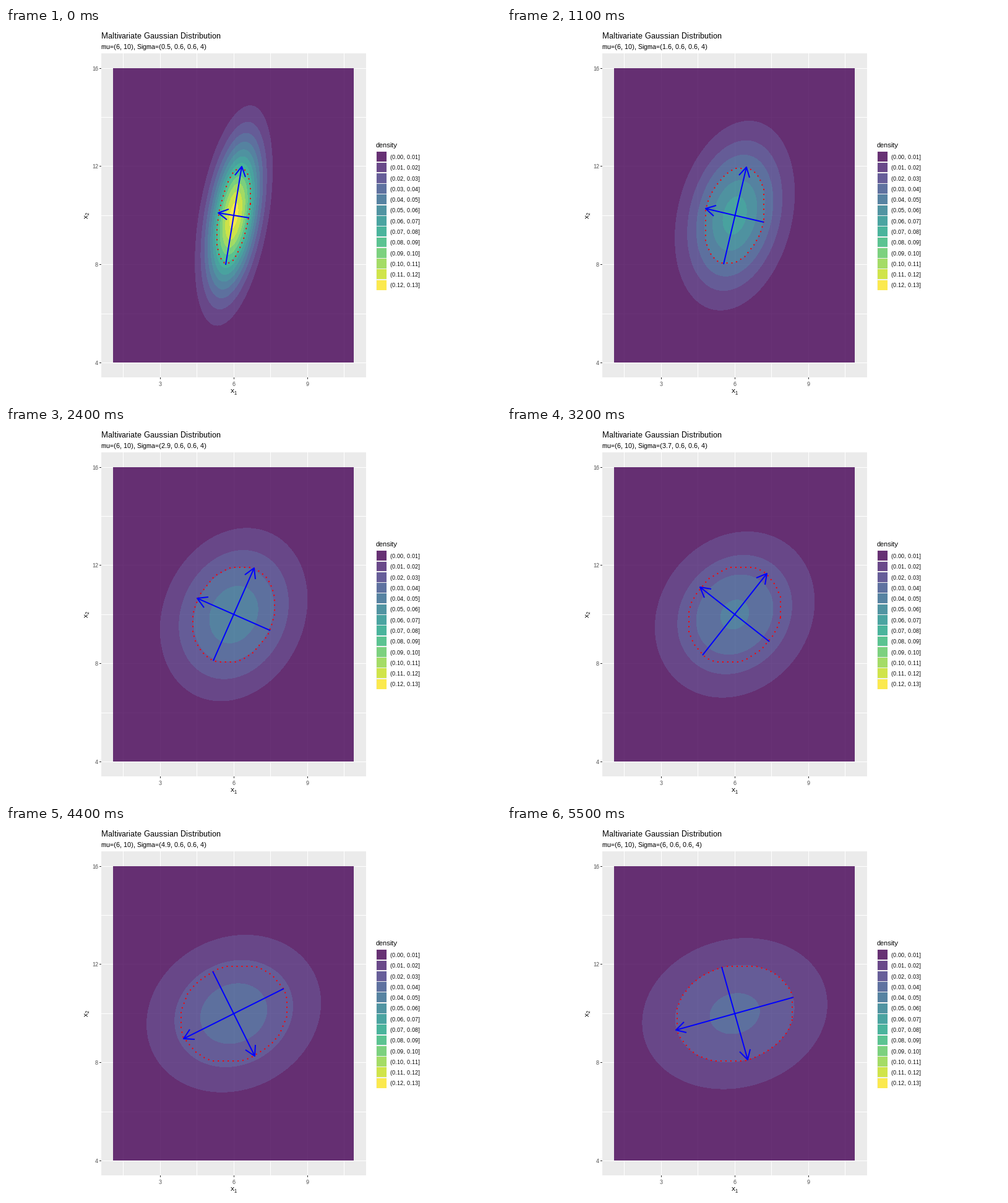
These frames come from a looping animation (800x600 px, 5600 ms). A matplotlib script:

```python
import numpy as np
import matplotlib.pyplot as plt
from matplotlib.animation import FuncAnimation
from matplotlib.patches import Rectangle

# Whole-pixel glyph advances without kerning.
plt.rcParams.update({
    "font.family": "Liberation Sans",
    "text.hinting": "native",
    "text.hinting_factor": 1,
    "text.kerning_factor": 6,
})

FRAMES, STEP_MS = 56, 100
W, H, DPI = 800, 600, 100
PX = 72 / DPI                    # points per pixel
K = 39.68                        # pixels per data unit
CX, CY = 368.1, 303.35           # screen place of the mean
MU = (6, 10)
COV, VAR2 = 0.6, 4.0
ALPHA = 0.8
BAND = 0.01
COLORS = plt.get_cmap("viridis")(np.linspace(0, 1, 13))[:, :3]
GREY = 235 / 255
LEFT, TOP, RIGHT, BOTTOM = 173, 65, 562, 541      # filled area
HALF_X, HALF_Y = 2 * np.sqrt(6), 6.0

# Offsets from the mean: a coarse grid for the hull, one point per pixel
# for the bands.
gx = np.linspace(-HALF_X, HALF_X, 101)
gy = np.linspace(-HALF_Y, HALF_Y, 101)
px = (np.arange(LEFT, RIGHT) + 0.5 - CX) / K
py = (CY - np.arange(TOP, BOTTOM) - 0.5) / K

fig = plt.figure(figsize=(W / DPI, H / DPI), dpi=DPI, facecolor="white")
ax = fig.add_axes([0, 0, 1, 1])
ax.set_xlim(0, W)
ax.set_ylim(H, 0)
ax.axis("off")


def to_px(dx, dy):
    return CX + K * np.asarray(dx), CY - K * np.asarray(dy)


def text(x, y, s, size, color="black", ha="left", rotation=0):
    return ax.text(x, y, s, fontsize=size * PX, color=color, ha=ha,
                   va="baseline", rotation=rotation, rotation_mode="anchor")


def rect(x0, y0, x1, y1, color, z=1.0):
    x0, y0, x1, y1 = (round(v) for v in (x0, y0, x1, y1))
    ax.add_patch(Rectangle((x0, y0), x1 - x0, y1 - y0, facecolor=color,
                           linewidth=0, antialiased=False, zorder=z))


def draw_panel():
    """Draw the plot background; return its part under the filled area."""
    under = np.full((BOTTOM - TOP, RIGHT - LEFT, 3), GREY)
    rect(154, 41, 582, 565, str(GREY))
    for v in np.arange(1.5, 10.6, 1.5):
        x = int(to_px(v - MU[0], 0)[0])
        rect(x, 41, x + 1, 565, "white", 1.1)
        under[:, x - LEFT] = 1
        if v % 3 == 0:
            rect(x, 565, x + 1, 568, "#333333")
            text(x + 0.5, 579, f"{v:g}", 9, "#4D4D4D", "center")
    for v in range(4, 17, 2):
        y = int(to_px(0, v - MU[1])[1])
        rect(154, y, 582, y + 1, "white", 1.1)
        if TOP <= y < BOTTOM:
            under[y - TOP] = 1
        if v % 4 == 0:
            rect(151, y, 154, y + 1, "#333333")
            text(149, y + 4, f"{v}", 9, "#4D4D4D", "right")
    text(363, 590, "x", 11)
    text(369, 593, "1", 8)
    text(133, 308, "x", 11, rotation=90)
    text(135, 302, "2", 8, rotation=90)
    return under


def draw_legend():
    text(598, 193, "density", 11)
    size, top = 17.28, 199.6
    rect(598, top, 598 + size, top + 13 * size, "#F2F2F2")
    for i, color in enumerate(COLORS):
        y = top + i * size
        rect(598.7, y + 0.7, 598 + size - 0.7, y + size - 0.7,
             ALPHA * color + (1 - ALPHA) * 0.95, 1.1)
        text(620.8, round(y + 12.4),
             f"({i * BAND:.2f}, {(i + 1) * BAND:.2f}]", 9)


def quad_form(x, y, var1):
    """Squared Mahalanobis distance on the grid of x and y."""
    x, y = np.meshgrid(x, y)
    det = var1 * VAR2 - COV ** 2
    return (VAR2 * x ** 2 - 2 * COV * x * y + var1 * y ** 2) / det


def band_image(var1):
    peak = 1 / (2 * np.pi * np.sqrt(var1 * VAR2 - COV ** 2))
    density = peak * np.exp(-quad_form(px, py, var1) / 2)
    return ALPHA * COLORS[(density / BAND).astype(int)] + (1 - ALPHA) * under


def hull(points):
    """Convex hull by monotone chain."""
    points = sorted(points)

    def chain(seq):
        out = []
        for p in seq:
            while len(out) > 1:
                (x0, y0), (x1, y1) = out[-2:]
                turn = (x1 - x0) * (p[1] - y0) - (y1 - y0) * (p[0] - x0)
                if turn > 1e-9:
                    break
                out.pop()
            out.append(p)
        return out

    return chain(points)[:-1] + chain(points[::-1])[:-1]


def one_sigma_hull(var1):
    """Outline of the grid points within one standard deviation."""
    ends = []
    for y, row in zip(gy, quad_form(gx, gy, var1)):
        inside = gx[row <= 1]
        if inside.size:
            ends += [(inside[0], y), (inside[-1], y)]
    loop = hull(ends)
    start = max(range(len(loop)), key=lambda i: (loop[i][0], -loop[i][1]))
    loop = (loop[start:] + loop[:start + 1])[::-1]
    return np.round(to_px(*np.array(loop).T))


def axes_of(var1):
    """Principal half axes, longest first."""
    mean, diff = (var1 + VAR2) / 2, (var1 - VAR2) / 2
    root = np.hypot(diff, COV)
    angle = 0.5 * np.arctan2(COV, diff)
    sign = -1 if var1 > VAR2 else 1
    c, s = sign * np.cos(angle), sign * np.sin(angle)
    return (np.sqrt(mean + root) * np.array([c, s]),
            np.sqrt(mean - root) * np.array([-s, c]))


def set_arrow(shaft, head, v, length=18):
    xs, ys = np.round(to_px([-v[0], v[0]], [-v[1], v[1]]))
    shaft.set_data(xs, ys)
    back = np.arctan2(ys[0] - ys[1], xs[0] - xs[1])
    turn = back + np.radians([30, 0, -30])
    reach = np.array([length, 0, length])
    head.set_data(np.round(xs[1] + reach * np.cos(turn)),
                  np.round(ys[1] + reach * np.sin(turn)))


def line(color, z, **kw):
    return ax.plot([], [], color=color, linewidth=2 * PX, zorder=z,
                   snap=False, solid_capstyle="butt", dash_capstyle="butt",
                   solid_joinstyle="round", **kw)[0]


under = draw_panel()
draw_legend()
text(154, 17, "Maltivariate Gaussian Distribution", 13)
subtitle = text(154, 34, "", 11)
bands = ax.imshow(under, extent=(LEFT, RIGHT, BOTTOM, TOP), aspect="auto",
                  interpolation="nearest", zorder=1.5)
ring = line("red", 2, linestyle=(0, (1, 3)))
arrows = [(line("blue", 2.5), line("blue", 2.5)) for _ in range(2)]


def update(i):
    var1 = round(0.5 + 0.1 * i, 1)
    bands.set_data(band_image(var1))
    ring.set_data(*one_sigma_hull(var1))
    for (shaft, head), v in zip(arrows, axes_of(var1)):
        set_arrow(shaft, head, v)
    subtitle.set_text(f"mu=(6, 10), Sigma=({var1:g}, 0.6, 0.6, 4)")
    return [bands, ring, subtitle]


anim = FuncAnimation(fig, update, frames=FRAMES, interval=STEP_MS,
                     repeat=True, repeat_delay=0, blit=False)
plt.show()
```
